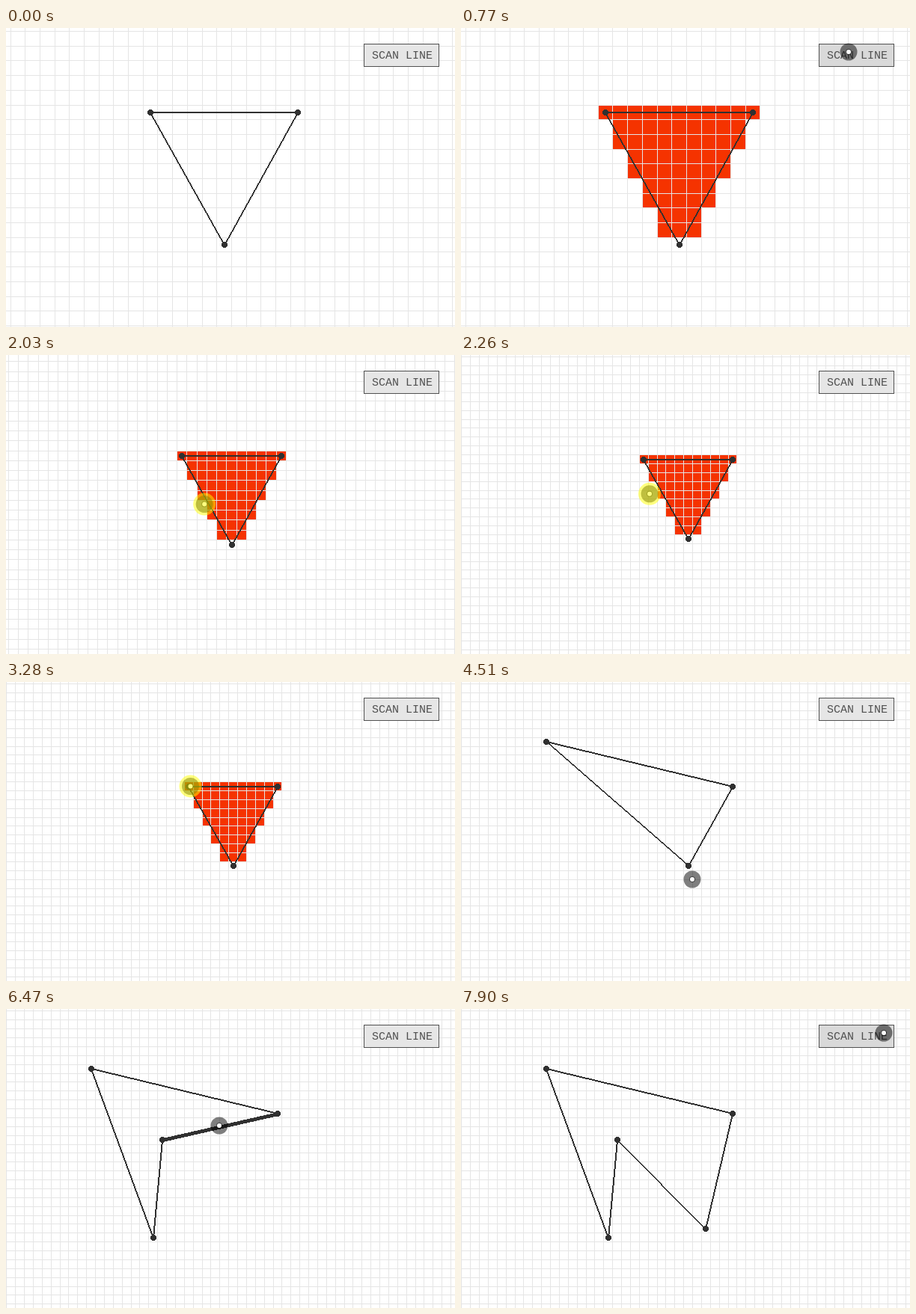
Animation of 600 by 400 pixels, one loop 8 s. Source, as an HTML page with a canvas:

```html
<!DOCTYPE html>
<html lang="en">
<head>
<meta charset="utf-8">
<title>Scan line polygon</title>
<style>
  html, body { margin: 0; width: 100%; height: 100%; overflow: hidden; background: #fff; }
  canvas { display: block; }
</style>
</head>
<body>
<canvas id="stage" width="600" height="400"></canvas>
<script>
const ctx = document.getElementById('stage').getContext('2d');
const LOOP = 8000, W = 600, H = 400, TAU = Math.PI * 2;
const INK = '#303030', FRAME = '#505050';
const STEP = 76, GRAB = 165;   // usual time per step, longest pause between grab and drag

const gesture = kind => (from, to, ...points) => ({ kind, from, to, points });
const move = gesture('move'), press = gesture('press'), fill = gesture('fill'), zoom = gesture('zoom');
const drag = (from, to, vertex, insert, point) =>
  ({ kind: 'drag', from, to, vertex, insert, points: [point] });

const SCRIPT = [
  move(80, 140, [521, 17]),
  move(290, 460, [518, 32]),
  press(690, 690),
  fill(770, 770),
  move(1100, 1400, [364, 156], [322, 180]),
  zoom(1650, 2410),
  move(2490, 3280, [246, 150], [262, 143.5], [246.5, 139.5]),
  drag(3360, 3880, 0, false, [119, 75]),
  move(4050, 4740, [170, 95], [260, 170], [307, 237], [311, 291], [307, 248]),
  drag(4900, 5140, 2, false, [197, 308]),
  move(5290, 5610, [189, 296], [255, 248]),
  drag(5760, 6076, 2, true, [208, 174]),
  move(6155, 6470, [285, 156]),
  drag(6720, 7032, 2, true, [327, 298]),
  move(7110, 7500, [618, 78]),
  move(7660, 7660, [594, 31]),
  move(7740, 7900, [565, 32])
];

const smoother = u => u ** 3 * (10 - 15 * u + 6 * u * u);

const view = k => ({ s: 19.69 * k, x: 322 - 128.9 * k, y: 180 - 67.1 * k });
const toScreen = (v, [c, r]) => [v.x + c * v.s, v.y + r * v.s];
const toCell = (v, [x, y]) => [Math.round((x - v.x) / v.s), Math.round((y - v.y) / v.s)];

// point at u along a polyline, equal time for each segment
function along(points, u) {
  const last = points.length - 1, i = Math.min(last - 1, Math.floor(u * last));
  const [a, b] = [points[i], points[i + 1]], f = u * last - i;
  return [a[0] + (b[0] - a[0]) * f, a[1] + (b[1] - a[1]) * f];
}

// play the script up to a time
function stateAt(time) {
  const state = { pointer: [640, 20], v: view(1), cells: [[0, 0], [10, 0], [5, 9]], filled: false, pressed: false };
  let held = 0;
  for (const g of SCRIPT) {
    if (time < g.from) {
      if (g.kind === 'drag' && held >= g.from - GRAB) state.pressed = true;
      break;
    }
    const count = Math.round((g.to - g.from) / STEP) + 1;
    const gap = (g.to - g.from) / (count - 1 || 1) || STEP;
    const i = Math.min(count - 1, Math.floor((time - g.from + 8) / gap));
    const u = (i + 1) / count;
    held = g.from + i * gap;
    state.pressed = g.kind !== 'move' && g.kind !== 'fill';
    if (g.points.length) state.pointer = along([state.pointer, ...g.points], u);
    if (g.kind === 'fill') state.filled = true;
    if (g.kind === 'zoom') {
      state.pointer = [322 - 70 * smoother(Math.min(1, u * 1.25)), 180 + 20 * Math.sin(Math.PI * u) ** 2];
      state.v = view(.603 + .397 * Math.exp(-18.84 * u ** 3.935));
    }
    if (g.kind === 'drag') {
      state.filled = false;
      state.cells.splice(g.vertex, g.insert ? 0 : 1, toCell(state.v, state.pointer));
    }
  }
  return state;
}

function edgeDistance([x, y], [ax, ay], [bx, by]) {
  const dx = bx - ax, dy = by - ay;
  const u = Math.max(0, Math.min(1, ((x - ax) * dx + (y - ay) * dy) / (dx * dx + dy * dy)));
  return Math.hypot(x - ax - u * dx, y - ay - u * dy);
}

function disc(x, y, r, color) {
  ctx.fillStyle = color;
  ctx.beginPath();
  ctx.arc(x, y, r, 0, TAU);
  ctx.fill();
}

// hard-edged dot and line, without smoothing
function dot([x, y], r) {
  for (let row = -r; row < r; row++) {
    const half = Math.round(Math.sqrt(r * r - (row + .5) ** 2));
    ctx.fillRect(x - half, y + row, half * 2, 1);
  }
}

function line([ax, ay], [bx, by], width) {
  const dx = bx - ax, dy = by - ay, n = Math.max(Math.abs(dx), Math.abs(dy));
  const flat = Math.abs(dx) >= Math.abs(dy), off = Math.floor(width / 2);
  for (let i = 0; i <= n; i++) {
    const x = Math.round(ax + dx * i / n), y = Math.round(ay + dy * i / n);
    if (flat) ctx.fillRect(x, y - off, 1, width);
    else ctx.fillRect(x - off, y, width, 1);
  }
}

function drawFill(v) {
  ctx.fillStyle = '#f53300';
  for (let row = 0; row < 9; row++) {
    const inset = Math.round(row * 5 / 9);
    const [x, y] = toScreen(v, [inset - .5, row - .5]);
    const left = Math.floor(x), top = Math.floor(y);
    ctx.fillRect(left, top, Math.floor(x + (11 - 2 * inset) * v.s) - left, Math.floor(y + v.s) - top);
  }
}

function drawGrid(v) {
  ctx.fillStyle = '#e5e5e5';
  const first = o => (o - v.s / 2) % v.s;
  for (let x = first(v.x); x < W; x += v.s) ctx.fillRect(Math.floor(x), 0, 1, H);
  for (let y = first(v.y); y < H; y += v.s) ctx.fillRect(0, Math.floor(y), W, 1);
}

function drawPolygon({ v, cells, pointer, pressed }) {
  const points = cells.map(c => toScreen(v, c).map(Math.round));
  const nearVertex = points.some(p => Math.hypot(p[0] - pointer[0], p[1] - pointer[1]) < 12);
  ctx.fillStyle = INK;
  points.forEach((a, i) => {
    const b = points[(i + 1) % points.length];
    const hover = !pressed && !nearVertex && edgeDistance(pointer, a, b) < 5;
    line(a, b, hover ? 5 : 2);
  });
  points.forEach(p => dot(p, 4));
}

function drawButton({ pointer: [x, y], pressed }) {
  const over = x > 478 && x < 579 && y > 21 && y < 52;
  ctx.fillStyle = over ? (pressed ? '#c4c4c4' : '#d9d9d9') : '#e6e6e6';
  ctx.fillRect(478, 21, 101, 31);
  ctx.strokeStyle = FRAME;
  ctx.lineWidth = 1;
  ctx.strokeRect(478.5, 21.5, 100, 30);
  ctx.fillStyle = FRAME;
  ctx.font = '15px "Liberation Mono", monospace';
  ctx.fillText('SCAN LINE', 489, 41);
}

function drawPointer({ pointer: [x, y], pressed }) {
  disc(x, y, 11.5, 'rgba(0,0,0,.5)');
  disc(x, y, 4, 'rgba(0,0,0,.45)');
  disc(x, y, 3, '#fff');
  if (pressed) disc(x, y, 15, 'rgba(255,255,0,.5)');
}

function draw(time) {
  const state = stateAt(time % LOOP);
  ctx.fillStyle = '#fff';
  ctx.fillRect(0, 0, W, H);
  if (state.filled) drawFill(state.v);
  drawGrid(state.v);
  drawPolygon(state);
  drawButton(state);
  drawPointer(state);
}

const begin = performance.now();
function tick() {
  draw(performance.now() - begin);
  requestAnimationFrame(tick);
}
tick();
</script>
</body>
</html>
```
